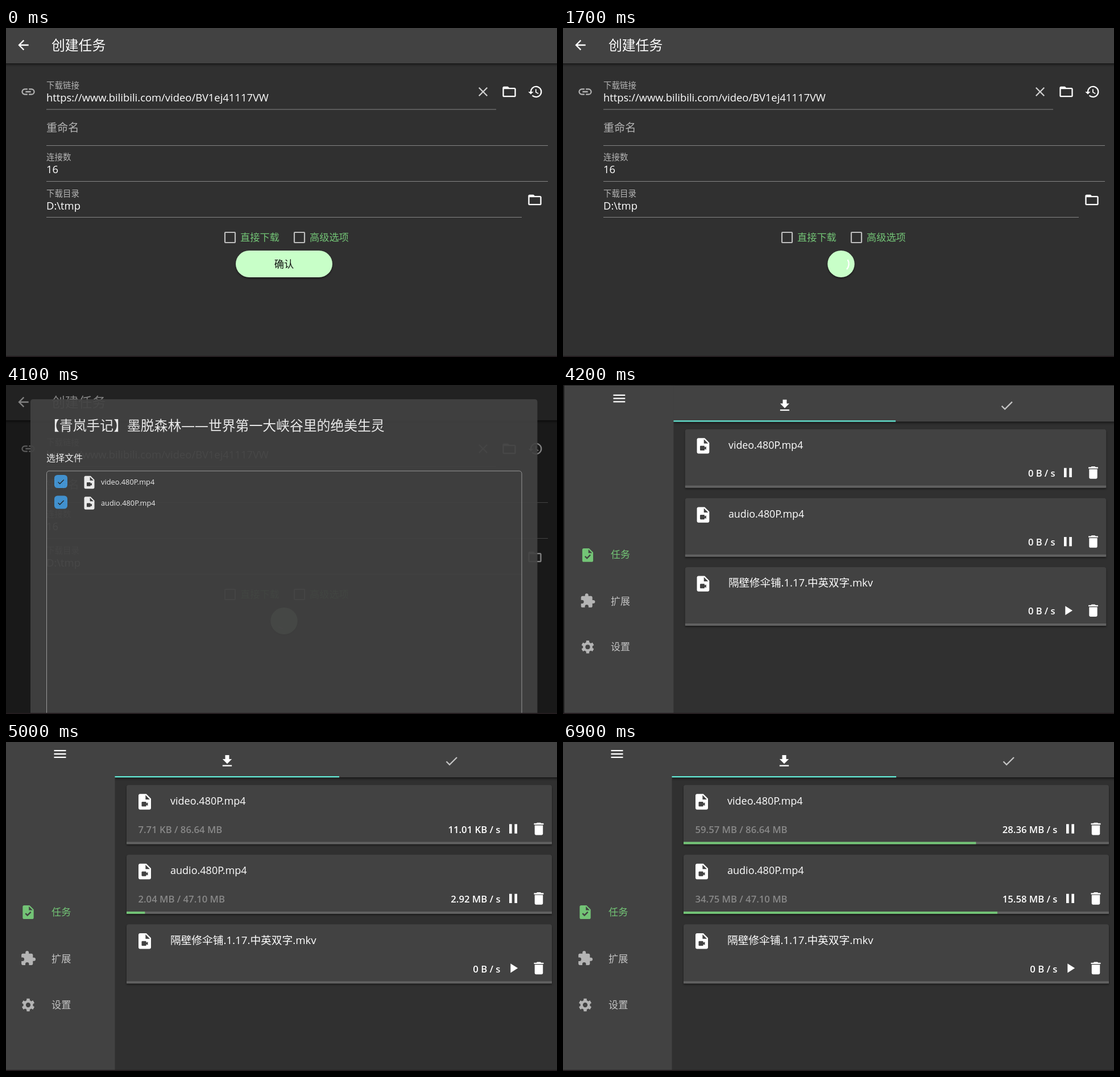
Animation of 969x578 px, one loop 7.2 s. Source, as an HTML page:

```html
<!DOCTYPE html>
<html lang="zh">
<head>
<meta charset="utf-8">
<style>
html, body { margin: 0; width: 100%; height: 100%; overflow: hidden; background: #303030; }
svg { display: block; width: 969px; height: 578px; }
text { font-family: "Open Sans", "Noto Sans CJK SC", "Noto Sans CJK", sans-serif; white-space: pre; }
.low { filter: drop-shadow(0 2px 1.5px #0007); }
</style>
</head>
<body>
<svg id="stage" viewBox="0 0 969 578"></svg>
<script>
const LOOP = 7200, STEP = 100;
const GREEN = '#73c476', GREY = '#b4b4b4', PANEL = '#424242';
const sheet = 'M14 2H6c-1.1 0-2 .9-2 2v16c0 1.1.9 2 2 2h12c1.1 0 2-.9 2-2V8zM13 9V3.5L18.5 9z';
// Shapes on a 24 unit grid
const icons = {
  back: 'M20 11H7.83l5.59-5.59L12 4l-8 8 8 8 1.41-1.41L7.83 13H20z',
  link: 'M3.9 12c0-1.71 1.39-3.1 3.1-3.1h4V7H7a5 5 0 0 0 0 10h4v-1.9H7c-1.71 0-3.1-1.39-3.1-3.1zM8 13h8v-2H8zM17 7h-4v1.9h4a3.1 3.1 0 0 1 0 6.2h-4V17h4a5 5 0 0 0 0-10z',
  close: 'M19 6.41L17.59 5 12 10.59 6.41 5 5 6.41 10.59 12 5 17.59 6.41 19 12 13.41 17.59 19 19 17.59 13.41 12z',
  folder: 'M20 6h-8l-2-2H4c-1.1 0-2 .9-2 2v12c0 1.1.9 2 2 2h16c1.1 0 2-.9 2-2V8c0-1.1-.9-2-2-2zm0 12H4V8h16z',
  history: 'M13 3a9 9 0 0 0-9 9H1l3.96 4.03L9 12H6a7 7 0 1 1 2.06 4.94l-1.42 1.42A9 9 0 1 0 13 3zm-1 5v5l4.28 2.54.72-1.21-3.5-2.08V8z',
  video: sheet + 'M14 14l2-1.06v4.12L14 16v1c0 .55-.45 1-1 1H9c-.55 0-1-.45-1-1v-4c0-.55.45-1 1-1h4c.55 0 1 .45 1 1z',
  task: sheet + 'M10.94 18L7.4 14.46l1.41-1.41 2.12 2.12 4.24-4.24 1.41 1.41z',
  menu: 'M3 18h18v-2H3zM3 13h18v-2H3zM3 6v2h18V6z',
  download: 'M19 9h-4V3H9v6H5l7 7zM5 18v2h14v-2z',
  check: 'M9 16.17L4.83 12l-1.42 1.41L9 19 21 7l-1.41-1.41z',
  pause: 'M6 19h4V5H6zM14 5v14h4V5z',
  play: 'M8 5v14l11-7z',
  trash: 'M6 19c0 1.1.9 2 2 2h8c1.1 0 2-.9 2-2V7H6zM19 4h-3.5l-1-1h-5l-1 1H5v2h14z',
  puzzle: 'M20.5 11H19V7c0-1.1-.9-2-2-2h-4V3.5a2.5 2.5 0 0 0-5 0V5H4c-1.1 0-2 .9-2 2v3.8h1.5a2.7 2.7 0 0 1 0 5.4H2V20c0 1.1.9 2 2 2h3.8v-1.5a2.7 2.7 0 0 1 5.4 0V22H17c1.1 0 2-.9 2-2v-4h1.5a2.5 2.5 0 0 0 0-5z'
};

const clamp = v => Math.min(1, Math.max(0, v));
function bezier(x1, y1, x2, y2) {
  const at = (a, b, s) => 3 * a * s * (1 - s) ** 2 + 3 * b * s * s * (1 - s) + s ** 3;
  return x => {
    let lo = 0, hi = 1;
    for (let i = 0; i < 24; i++) {
      const mid = (lo + hi) / 2;
      if (at(x1, x2, mid) < x) lo = mid; else hi = mid;
    }
    return at(y1, y2, lo);
  };
}
const squeeze = bezier(.785, .135, .15, .86);
const sweepEase = bezier(.4, 0, .2, 1);

const text = (x, y, size, str, fill = '#fff', more = '') =>
  `<text x="${x}" y="${y}" font-size="${size}" fill="${fill}" ${more}>${str}</text>`;
const rect = (x, y, w, h, fill, more = '') =>
  `<rect x="${x}" y="${y}" width="${w}" height="${h}" fill="${fill}" ${more}/>`;
const icon = (name, x, y, size = 27.5, fill = '#fff') =>
  `<path d="${icons[name]}" fill="${fill}" fill-rule="evenodd" transform="translate(${x} ${y}) scale(${size / 24}) translate(-12 -12)"/>`;
const group = (body, attrs) => `<g ${attrs}>${body}</g>`;

function spinner(ms) {
  const phase = ms / 1333 % 1;
  const head = sweepEase(clamp(phase * 2)) * 270;
  const tail = sweepEase(clamp(phase * 2 - 1)) * 270;
  const start = -90 + tail + ms / 2222 * 360 + phase * 90;
  return `<circle cx="489" cy="414.5" r="13.7" fill="none" stroke="#fff" stroke-width="2.3" pathLength="360"
    stroke-dasharray="${Math.max(2, head - tail)} 360" transform="rotate(${start} 489 414.5)" opacity="${clamp(ms / 200)}"/>`;
}

function button(t) {
  const ms = Math.max(0, (t - 850) * 1.145);
  const w = 170 - 122.5 * squeeze(clamp(ms / 500));
  const fill = t >= 500 && t < 900 ? '#c0f5c0' : '#c8ffc8';
  return rect(489 - w / 2, 391, w, 47, fill, 'rx="23.5" class="low"') +
    text(489, 421, 17.2, '确认', '#111', `text-anchor="middle" opacity="${1 - clamp(ms / 200)}"`) +
    (ms ? spinner(ms) : '');
}

function form(t) {
  const line = (y, end) => rect(71, y, end - 71, 1, '#858585');
  const option = (x, label) =>
    rect(x + 1, 359, 18, 18, 'none', 'rx="1" stroke="#bdbdbd" stroke-width="2.2"') +
    text(x + 28, 374.3, 17.2, label, GREEN);
  return rect(0, 0, 969, 578, '#303030') +
    rect(-9, -9, 987, 71, PANEL, 'style="filter:drop-shadow(0 2px 2px #0009)"') +
    icon('back', 30.5, 30) + text(80, 38.7, 23.8, '创建任务') +
    icon('link', 39, 112, 28, GREY) +
    text(71, 105.5, 14.5, '下载链接', GREY) +
    text(71, 129, 18.4, 'https://www.bilibili.com/video/BV1ej41117VW') +
    icon('close', 839, 112, 27.5, '#d0d0d0') + icon('folder', 885, 112, 28) + icon('history', 931, 112) +
    line(142.5, 862) +
    text(71, 182, 19.1, '重命名', GREY) + line(206, 953) +
    text(71, 232, 14.5, '连接数', GREY) + text(71, 255, 18.4, '16') + line(269, 953) +
    text(71, 295.5, 14.5, '下载目录', GREY) + text(71, 318.5, 18.4, 'D:\\tmp') + line(332, 907) +
    icon('folder', 930, 302, 28) +
    option(384, '直接下载') + option(506, '高级选项') + button(t);
}

function dialog() {
  const row = (y, name) =>
    rect(85, y - 12, 23, 23, '#469cdf', 'rx="5.5"') +
    icon('check', 96.5, y, 15, '#222') + icon('video', 146.5, y + 1, 27) +
    text(167, y + 5, 12.8, name);
  return rect(43, 25, 891.5, 600, PANEL, 'rx="4.5"') +
    text(70, 79.7, 23.84, '【青岚手记】墨脱森林——世界第一大峡谷里的绝美生灵') +
    text(71, 134.3, 16, '选择文件') +
    rect(71.5, 151, 835.5, 500, 'none', 'rx="4.5" stroke="#a6a6a6"') +
    row(170, 'video.480P.mp4') + row(206.5, 'audio.480P.mp4');
}

function gear(x, y) {
  let teeth = '';
  for (let a = 0; a < 360; a += 60) teeth += rect(-2.4, -9.8, 4.8, 4.5, GREY, `rx=".6" transform="rotate(${a})"`);
  return group(`<circle r="5.5" fill="none" stroke="${GREY}" stroke-width="3.8"/>` + teeth,
    `transform="translate(${x} ${y}) scale(1.15)"`);
}

// Per file: megabytes done, shown amount, speed
function progress(t) {
  if (t < 5000) return [[0, '', '0 B / s'], [0, '', '0 B / s']];
  if (t < 5900) return [[.0075, '7.71 KB', '11.01 KB / s'], [2.04, '2.04 MB', '2.92 MB / s']];
  if (t < 6900) return [[31.21, '31.21 MB', '31.20 MB / s'], [19.17, '19.17 MB', '17.13 MB / s']];
  return [[59.57, '59.57 MB', '28.36 MB / s'], [34.75, '34.75 MB', '15.58 MB / s']];
}

function card(i, name, size, total, [done, amount, speed], action) {
  const y = 75.5 + i * 122.4;
  return group(rect(212, y, 748, 104, PANEL, 'rx="4"') + rect(212, y + 100, 748, 4, '#616161'), 'class="low"') +
    rect(212, y + 100, total ? 748 * done / total : 0, 4, GREEN) +
    icon('video', 244, y + 29.5, 33) + text(289, y + 34.3, size, name) +
    (amount && text(232.5, y + 84.3, 16.7, `${amount} / ${total.toFixed(2)} MB`, '#888', 'font-weight="600"')) +
    text(869.5, y + 84.3, 16.7, speed, '#fff', 'font-weight="600" text-anchor="end"') +
    icon(action, 892, y + 77, 28) + icon('trash', 937, y + 77, 29);
}

function tasks(t) {
  const [video, audio] = progress(t);
  const item = (y, label, fill) => text(80, y, 17.2, label, fill);
  return rect(-2.5, -2, 990, 590, '#303030') +
    rect(191, -2, 800, 64, PANEL, 'style="filter:drop-shadow(0 2px 2px #0009)"') +
    rect(-2.5, -2, 194, 590, PANEL) +
    rect(191.5, 60, 394.5, 2.3, '#64ead6') +
    icon('menu', 95, 21, 28) + icon('download', 389, 33.5, 28) + icon('check', 783.5, 33.5, 27.5, '#c4c4c4') +
    icon('task', 39, 299, 29, GREEN) + item(304.5, '任务', GREEN) +
    icon('puzzle', 39, 380, 28.5, GREY) + item(386.7, '扩展', '#c4c4c4') +
    gear(39, 462) + item(468.3, '设置', '#c4c4c4') +
    card(0, 'video.480P.mp4', 18, 86.64, video, 'pause') +
    card(1, 'audio.480P.mp4', 18, 47.1, audio, 'pause') +
    card(2, '隔壁修伞铺.1.17.中英双字.mkv', 18.7, 0, [0, '', '0 B / s'], 'play');
}

function scene(t) {
  if (t >= 4200) {
    const s = t < 4300 ? .99 : t < 4400 ? .998 : 1;
    return rect(0, 0, 969, 578, '#171717') +
      group(tasks(t), `transform="translate(484.5 289) scale(${s}) translate(-484.5 -289)"`);
  }
  const open = t < 1800 ? 0 : t < 1900 ? .6 : t < 4100 ? 1 : .91;
  return form(t) + (open ? rect(0, 0, 969, 578, '#000', `opacity="${.54 * open}"`) + group(dialog(), `opacity="${open}"`) : '');
}

const stage = document.getElementById('stage');
let shown = -1;
function tick() {
  const t = Math.floor(performance.now() % LOOP / STEP) * STEP;
  if (t !== shown) {
    shown = t;
    stage.innerHTML = scene(t) + rect(0, 576, 969, 2, '#241d20');
  }
  requestAnimationFrame(tick);
}
tick();
</script>
</body>
</html>
```
